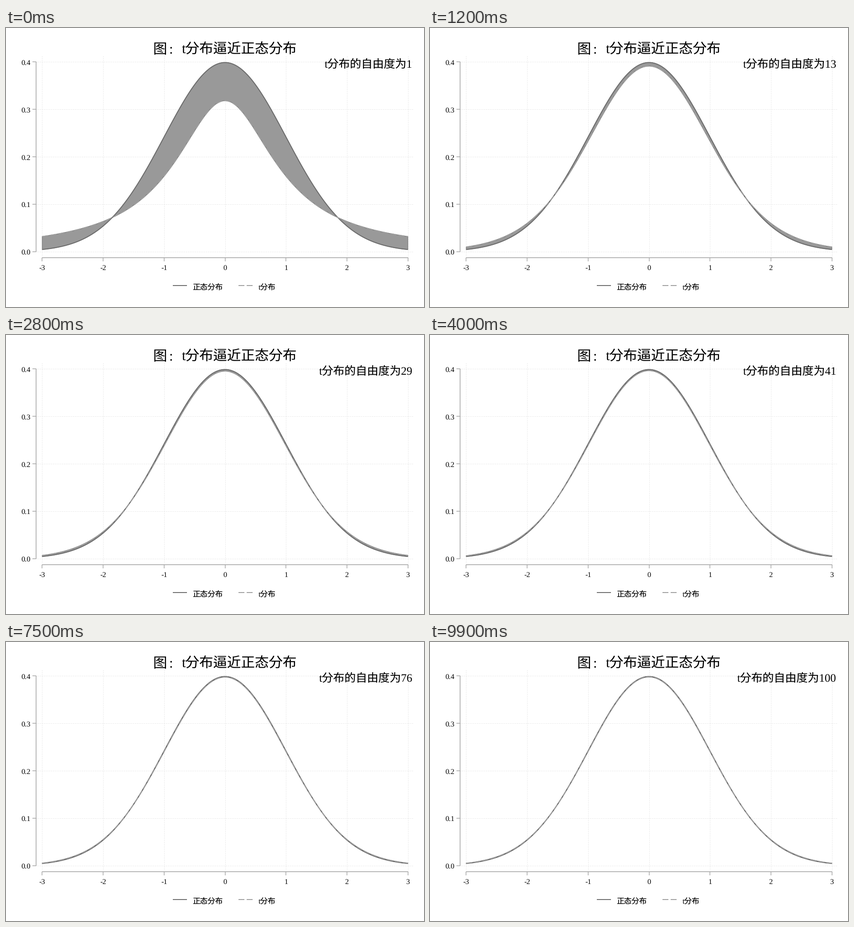
A matplotlib script that plays this animation: 917 px wide and 611 px high, repeating every 10000 ms.

```python
from math import gamma, pi, sqrt

import numpy as np
import matplotlib.pyplot as plt
from matplotlib.animation import FuncAnimation

W, H, DPI = 917, 611, 64
FRAMES, INTERVAL = 100, 100

DARK, LIGHT = "#6e6e6e", "#a0a0a0"
FILL, EDGE = "#999999", "#828282"
AXIS, GRID = "#a6a6a6", "#c8c8c8"

plt.rcParams["font.family"] = ["Liberation Serif", "Noto Sans CJK JP"]
plt.rcParams["text.hinting"] = "none"


def px(n):
    """Pixels to points."""
    return n * 72 / DPI


def sx(v):
    return 480.5 + 133.67 * v


def sy(v):
    return 489.7 - 1038 * v


def normal_pdf(x):
    return np.exp(-x**2 / 2) / sqrt(2 * pi)


def t_pdf(x, df):
    c = gamma((df + 1) / 2) / (sqrt(df * pi) * gamma(df / 2))
    return c * (1 + x**2 / df) ** (-(df + 1) / 2)


fig = plt.figure(figsize=(W / DPI, H / DPI), dpi=DPI, facecolor="white")
ax = fig.add_axes([0, 0, 1, 1])
ax.set_xlim(0, W)
ax.set_ylim(H, 0)
ax.axis("off")


def line(xs, ys, color, width, dash=None, z=2):
    style = (0, [d / width for d in dash]) if dash else "-"
    return ax.plot(xs, ys, color=color, lw=px(width), ls=style, zorder=z,
                   solid_capstyle="butt", dash_capstyle="butt")[0]


def label(x, y, s, size, ha="left"):
    return ax.text(x, y, s, fontsize=px(size), ha=ha, va="baseline",
                   color="black", zorder=6)


# Grid, axes and tick labels
DOTS = (1, 3)
for v in range(-3, 4):
    x = sx(v)
    line([x, x], [62, 503], GRID, 1, DOTS, z=1)
    line([x, x], [503, 511], AXIS, 1.5)
    label(x, 529.7, str(v), 16.2, "center")
for k in range(5):
    y = sy(k / 10)
    line([67, 893], [y, y], GRID, 1, DOTS, z=1)
    line([58, 66], [y, y], AXIS, 1.5)
    label(54, y + 6.2, f"{k / 10:.1f}", 16.4, "right")
line([66, 66], [sy(0.4) - 0.7, sy(0) + 0.7], AXIS, 1.6)
line([sx(-3) - 0.7, sx(3) + 0.7], [503, 503], AXIS, 1.6)

# Title
label(323, 55.5, "图", 30.5)
label(361.5, 55.5, ":", 30.5, "center")
label(638.5, 55.5, "t分布逼近正态分布", 30.5, "right")

# Legend
DASH = (13, 5)
line([366, 397], [564.3, 564.3], DARK, 2)
label(409.5, 572.6, "正态分布", 16.6)
line([510, 541], [564.3, 564.3], LIGHT, 2, DASH)
label(553.5, 572.6, "t分布", 16.6)

# Curves
x = np.linspace(-3, 3, 300)
xs, base = sx(x), sy(normal_pdf(x))
area, = ax.fill(xs, base, facecolor=FILL, edgecolor=EDGE, lw=px(1.5), zorder=3)
line(xs, base, DARK, 2.1, z=4)
t_line = line(xs, base, LIGHT, 2, DASH, z=5)
note = label(891.5, 87.8, "", 24.8, "right")


def update(i):
    df = i + 1
    ys = sy(t_pdf(x, df))
    t_line.set_ydata(ys)
    area.set_xy(np.column_stack([np.r_[xs, xs[::-1]], np.r_[base, ys[::-1]]]))
    note.set_text(f"t分布的自由度为{df}")
    return area, t_line, note


anim = FuncAnimation(fig, update, frames=FRAMES, interval=INTERVAL,
                     repeat=True, repeat_delay=0, blit=False)
plt.show()
```
